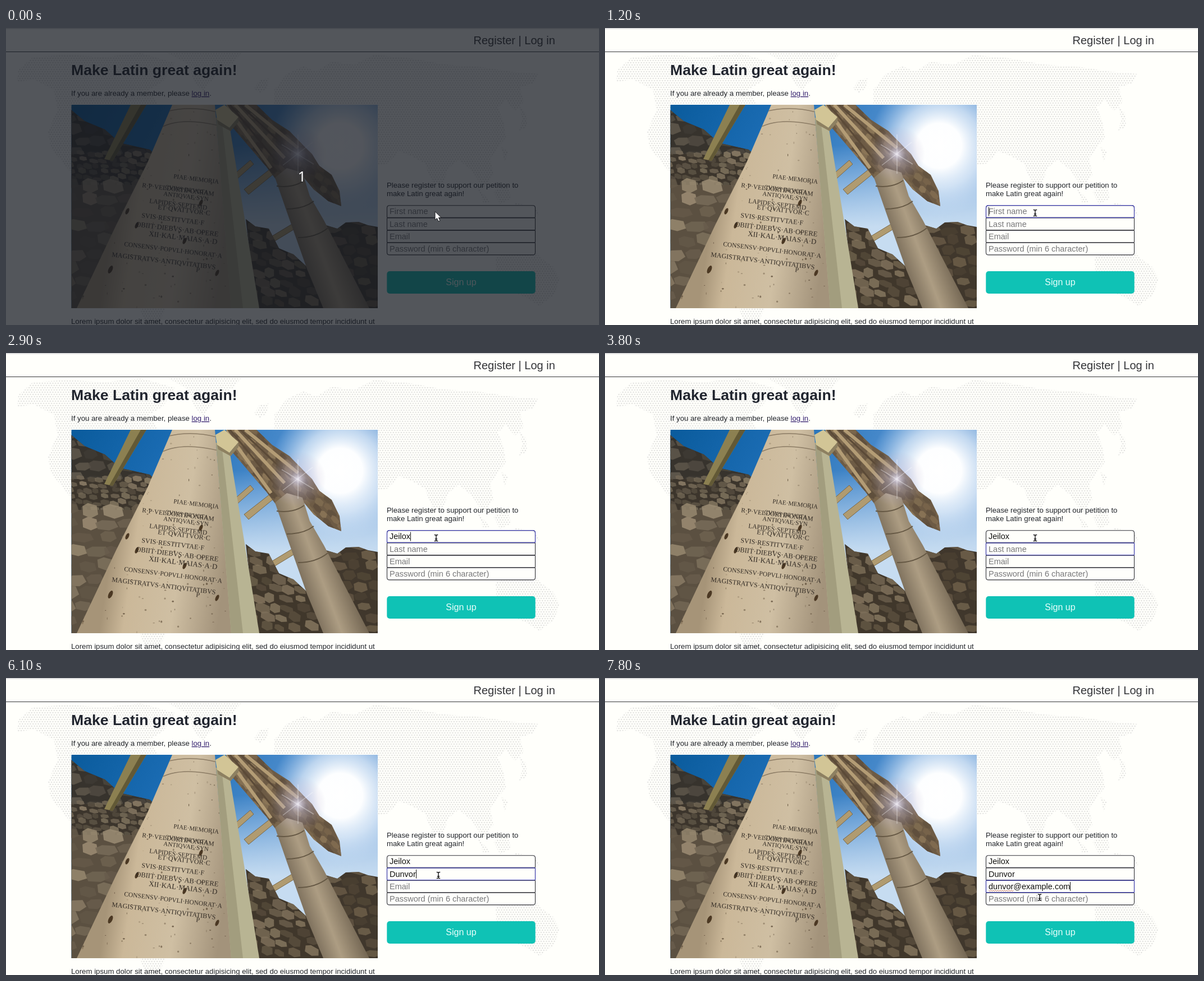
Write an HTML page that moves like this. It is 1056 by 530 pixels and loops after 8 s.

```html
<!DOCTYPE html>
<html lang="en">
<head>
<meta charset="utf-8">
<title>Petition sign-up</title>
<style>
  html, body { margin: 0; width: 100%; height: 100%; overflow: hidden; background: #fffffb; }
  svg { display: block; width: 1056px; height: 530px; font: 13.23px "Liberation Sans", Arial, sans-serif; fill: #22252b; }
  text { white-space: pre; }
  .field { font-size: 14.5px; }
  .carved { font-family: "Liberation Serif", serif; fill: #332c25; }
</style>
</head>
<body>
<svg viewBox="0 0 1056 530">
  <defs>
    <pattern id="dots" width="4.7" height="8" patternUnits="userSpaceOnUse">
      <g fill="#dededc"><circle cx="1.2" cy="2" r="1.15"/><circle cx="3.55" cy="6" r="1.15"/></g>
    </pattern>
    <linearGradient id="sky" x2="1" y2=".35">
      <stop offset="0" stop-color="#0a5b9c"/><stop offset=".3" stop-color="#1a6bb2"/>
      <stop offset=".65" stop-color="#4a8bcc"/><stop offset="1" stop-color="#7fa9d8"/>
    </linearGradient>
    <linearGradient id="haze" x2="0" y2="1">
      <stop offset=".2" stop-color="#cfe3f6" stop-opacity="0"/><stop offset=".6" stop-color="#c6dcf1"/>
    </linearGradient>
    <radialGradient id="sun">
      <stop offset="0" stop-color="#fff"/><stop offset=".32" stop-color="#fdfeff"/>
      <stop offset=".6" stop-color="#e4effb" stop-opacity=".72"/><stop offset="1" stop-color="#c2daf5" stop-opacity="0"/>
    </radialGradient>
    <radialGradient id="flare">
      <stop offset="0" stop-color="#f3efff" stop-opacity=".9"/><stop offset=".3" stop-color="#c7c2e0" stop-opacity=".45"/>
      <stop offset="1" stop-color="#b6a9c5" stop-opacity="0"/>
    </radialGradient>
    <linearGradient id="shaft" gradientUnits="userSpaceOnUse" x1="195" y1="300" x2="400" y2="330">
      <stop offset="0" stop-color="#a69478"/><stop offset=".2" stop-color="#cbb899"/>
      <stop offset=".6" stop-color="#cfbfa3"/><stop offset="1" stop-color="#a3937b"/>
    </linearGradient>
    <linearGradient id="shaft2" gradientUnits="userSpaceOnUse" x1="520" y1="400" x2="600" y2="370">
      <stop offset="0" stop-color="#796c59"/><stop offset=".45" stop-color="#ad9d83"/><stop offset="1" stop-color="#716451"/>
    </linearGradient>
    <clipPath id="photo"><rect x="116.5" y="137" width="545.5" height="363"/></clipPath>
    <clipPath id="wallL"><path d="M116 146L140 166 176 181 203 205 256 217 300 260 240 500H116Z"/></clipPath>
    <clipPath id="wallM"><path d="M427 341L444 354 468 358 486 393 512 404 540 430 575 500H445Z"/></clipPath>
    <clipPath id="wallR"><path d="M570 352L590 358 605 347 628 346 645 352 662 355V500H628Z"/></clipPath>
    <clipPath id="lintel"><path d="M392 137H446L474 164 505 184 528 208 545 225 558 246 580 262 594 291 597 318 574 309 548 288 528 264 482 272 463 247 404 178Z"/></clipPath>
    <clipPath id="column"><path d="M296 137H372L402 500H126L196 352 252 240Z"/></clipPath>
  </defs>

  <rect width="1056" height="530" fill="#fffffb"/>
  <g fill="url(#dots)">
    <path d="M22 75L48 52 110 48 175 52 240 45 300 62 280 95 255 110 270 137H300V260H117L100 238 80 215 75 185 92 145 85 110 50 92 20 96Z"/>
    <path d="M285 43H420L405 62 385 72 368 92 350 112 335 95 325 65Z"/>
    <path d="M442 108L452 92 468 90 464 108 452 116Z"/>
    <path d="M478 110L500 82 530 68 552 78 580 60 620 66 655 48 720 54 780 65 850 70 900 78 948 82 940 98 915 106 922 132 906 148 890 128 876 142 886 168 890 195 876 214 862 232 868 262 850 285 830 255 806 235 788 250 775 285 760 278 746 242 722 228 700 220 680 242 662 244V137H478Z"/>
    <path d="M914 140L926 152 928 176 912 184 920 164ZM882 210L894 222 888 238ZM840 285L862 310 850 312ZM868 292L892 280 900 304 880 314ZM905 312L940 318 952 334 918 330Z"/>
    <path d="M872 410L905 392 920 400 936 388 950 408 974 426 986 448 976 476 950 496 925 480 898 470 875 474Z"/>
    <path d="M238 498H286L276 518 264 530H249Z"/>
  </g>
  <path d="M0 1H1056" stroke="#b9b9bd"/>
  <path d="M0 42.5H1056" stroke="#35363a"/>
  <text x="832.5" y="28.5" font-size="20" fill="#333438">Register | Log in</text>
  <text x="116" y="84" font-size="26.6" font-weight="bold" fill="#20242e">Make Latin great again!</text>
  <text x="116" y="121">If you are already a member, please <tspan fill="#34206f" text-decoration="underline">log in</tspan>.</text>
  <text x="116" y="528">Lorem ipsum dolor sit amet, consectetur adipisicing elit, sed do eiusmod tempor incididunt ut</text>

  <g clip-path="url(#photo)">
    <rect x="116" y="137" width="546" height="363" fill="url(#sky)"/>
    <rect x="380" y="137" width="282" height="363" fill="url(#haze)"/>
    <circle cx="595" cy="210" r="125" fill="url(#sun)"/>
    <g fill="#b09b70" stroke="#786646">
      <path d="M405 262L435 236 441 243 411 270ZM424 288L470 252 477 260 432 297ZM453 384L514 347 520 355 456 394Z"/>
    </g>
    <g id="masonry"></g>
    <path d="M222 137H250L190 237 175 234Z" fill="#8c8051"/>
    <path d="M240 137H250L190 237 184 236Z" fill="#625936"/>
    <path d="M479 267L500 250 528 258 541 300 566 343 647 500H565L536 430 499 325Z" fill="url(#shaft2)"/>
    <path d="M482 282Q512 286 531 272M500 323Q530 323 548 309M520 374Q552 374 573 357" fill="none" stroke="#655844" stroke-width="2"/>
    <g clip-path="url(#column)">
      <rect x="116" y="137" width="300" height="363" fill="url(#shaft)"/>
      <g id="pits"></g>
      <path d="M270 181Q306 157 378 174M286 149Q330 138 375 150" fill="none" stroke="#8b7b64" stroke-width="1.5"/>
    </g>
    <path d="M374 160L397 168 451 500H401Z" fill="#b8b493"/>
    <path d="M374 160L384 163 422 500H401Z" fill="#a29d7e"/>
    <path d="M373 146L389 137 414 159 398 178 376 164Z" fill="#d2c596"/>
    <path d="M376 164L398 178 414 159V168L400 184 378 172Z" fill="#8d8061"/>
    <g id="inscription" class="carved"></g>
    <circle cx="520" cy="225" r="50" fill="url(#flare)"/>
    <path d="M520 190V260M491 208L548 243M493 245L546 204" stroke="#fff" stroke-opacity=".35" stroke-width="1.5"/>
  </g>

  <text x="678" y="285">Please register to support our petition to</text>
  <text x="678" y="299.5">make Latin great again!</text>
  <g id="form"></g>
  <path id="squiggle" fill="none" stroke="#b9654c" stroke-width="1"/>
  <path id="caret" stroke="#111"/>
  <rect x="678.3" y="434" width="264.4" height="40" rx="5" fill="#0fc2b5"/>
  <text x="810.5" y="459" font-size="16" text-anchor="middle" fill="#eafffb">Sign up</text>

  <g id="ibeam" fill="none" stroke-linecap="round">
    <path id="beamShape" d="M-2.7 -5.5Q0 -5.5 0 -4 0 -5.5 2.7 -5.5M0 -4.5V4.5M-2.7 5.5Q0 5.5 0 4 0 5.5 2.7 5.5M-1.6 2H1.6" stroke="#fff" stroke-width="3"/>
    <use href="#beamShape"/>
    <path d="M-2.7 -5.5Q0 -5.5 0 -4 0 -5.5 2.7 -5.5M0 -4.5V4.5M-2.7 5.5Q0 5.5 0 4 0 5.5 2.7 5.5M-1.6 2H1.6" stroke="#111" stroke-width="1.4"/>
  </g>
  <g id="countdown">
    <rect width="1056" height="530" fill="#141820" fill-opacity=".73"/>
    <text x="527" y="274" text-anchor="middle" style="font: 25px 'Noto Sans', sans-serif" fill="#fff">1</text>
    <path d="M764 327.5V342.5L767.5 339.5 770 345 772.8 343.8 770.4 338.4H775Z" fill="#fff" stroke="#15171b"/>
  </g>
</svg>
<script>
const LOOP = 8000;
const TEXT_X = 683;
const $ = id => document.getElementById(id);

function add(parent, tag, attrs, text = '') {
  const node = document.createElementNS('http://www.w3.org/2000/svg', tag);
  for (const key in attrs) node.setAttribute(key, attrs[key]);
  node.textContent = text;
  return parent.appendChild(node);
}

let seed = 17;
const random = () => (seed = seed * 16807 % 2147483647) / 2147483647;
const between = (a, b) => a + (b - a) * random();

// Irregular courses of stone inside a clipped area.
function stones(clip, [x, y, w, h], size, base, tones, tilt = 0) {
  const group = add($('masonry'), 'g', { 'clip-path': `url(#${clip})` });
  add(group, 'rect', { x, y, width: w, height: h, fill: base });
  for (let row = y; row < y + h; row += size * .62) {
    for (let col = x - random() * size; col < x + w; col += size * between(.7, 1.2)) {
      const sw = size * between(.35, .55), sh = size * between(.2, .34);
      const cy = row + between(-3, 3);
      const d = `M${col - sw} ${cy - sh * .5}L${col - sw * .4} ${cy - sh} ${col + sw * .7} ${cy - sh * .8} ` +
        `${col + sw} ${cy + sh * .4} ${col + sw * .2} ${cy + sh} ${col - sw * .8} ${cy + sh * .7}Z`;
      add(group, 'path', {
        d, fill: tones[Math.floor(random() * tones.length)], opacity: between(.5, .95),
        transform: `rotate(${tilt + between(-9, 9)} ${col} ${cy})`
      });
    }
  }
}

stones('wallL', [116, 140, 190, 90], 34, '#37332d', ['#534d43', '#60594d', '#403c36']);
stones('wallL', [116, 225, 190, 60], 17, '#3c352c', ['#756a57', '#5b5244', '#867963'], 10);
stones('wallL', [116, 280, 150, 220], 40, '#5b5041', ['#8b7d67', '#766a57', '#9b8c73', '#675b4b']);
stones('wallM', [425, 338, 155, 165], 27, '#40372b', ['#6d604b', '#7e705a', '#574c3c', '#8b7c63'], 18);
stones('wallR', [568, 342, 96, 160], 30, '#40372c', ['#655843', '#75664f', '#514636']);
stones('lintel', [390, 136, 210, 185], 19, '#6d5b45', ['#8c7758', '#5e4e3c', '#806b50'], 40);
const lintel = add($('masonry'), 'g', { 'clip-path': 'url(#lintel)', fill: 'none' });
for (let i = 0; i < 5; i++) {
  add(lintel, 'path', {
    d: `M${390 + i * 9} 137L${472 + i * 12} ${250 - i * 9}`,
    stroke: i % 2 ? '#5b4a37' : '#b39c75', 'stroke-width': i % 2 ? 3 : 6
  });
}

for (let i = 0; i < 150; i++) {
  add($('pits'), 'ellipse', {
    cx: between(130, 400), cy: between(140, 500), rx: between(.5, 1.9), ry: between(.5, 2.3),
    fill: '#5d4c38', opacity: between(.15, .8)
  });
}
for (const [cx, cy, r] of [[216, 327, 4], [233, 352, 4], [186, 431, 5], [347, 312, 4], [376, 437, 4], [318, 380, 4]])
  add($('pits'), 'ellipse', { cx, cy, rx: r * .7, ry: r * 1.5, fill: '#4b3823', transform: `rotate(25 ${cx} ${cy})` });

const carving = [
  [298, 268, 11, 'PIAE·MEMORIA'], [242, 284, 11.5, 'R·P·VELDORTII·ONRAM'],
  [283, 287, 10.5, 'CVIVS·DEVOTA'], [280, 299, 11, 'ANTIQVAE·SYN'],
  [255, 312, 11.5, 'LAPIDES·SEPTEMD'], [270, 323, 12, 'ET·QVATTVOR·C'],
  [241, 338, 12, 'SVIS·RESTITVTAE·F'], [231, 354, 12.5, 'OBIIT·DIEBVS·AB·OPERE'],
  [254, 371, 13, 'XII·KAL·MAIAS·A·D'], [210, 389, 11.5, 'CONSENSV·POPVLI·HONORAT·A'],
  [188, 408, 12, 'MAGISTRATVS·ANTIQVITATIBVS'], [338, 435, 12, 'P']
];
for (const [x, y, size, line] of carving)
  add($('inscription'), 'text', { x, y, 'font-size': size, transform: `rotate(7 ${x} ${y})` }, line);

// Each key time reveals one more character; a pasted value has a single key.
const fields = [
  { hint: 'First name', focus: 1200, blur: 3200, value: 'Jeilox', keys: [1800, 2100, 2300, 2500, 2600, 2900] },
  { hint: 'Last name', focus: 3200, blur: 7000, value: 'Dunvor', keys: [4000, 4200, 4600, 4800, 5000, 5600] },
  { hint: 'Email', focus: 7000, blur: LOOP, value: 'dunvor@example.com', keys: [7300], pasted: true },
  { hint: 'Password (min 6 character)', focus: LOOP, blur: LOOP, value: '', keys: [] }
];
const caretOff = [[1700, 1800], [3800, 4000], [6200, 7000]];
const pointer = [
  [0, 766, 330], [6100, 770, 352], [6200, 772, 357], [6300, 773, 361],
  [6400, 774, 365], [6600, 774, 368.5], [7800, 774, 391.5]
];

function outline(i) {
  const top = 316.7 + i * 22.2, bottom = top + 21.6, left = 678.5, right = 942.5;
  const a = i === 0 ? 4.5 : 1, b = i === 3 ? 4.5 : 1;
  return `M${left + a} ${top}H${right - a}Q${right} ${top} ${right} ${top + a}V${bottom - b}` +
    `Q${right} ${bottom} ${right - b} ${bottom}H${left + b}Q${left} ${bottom} ${left} ${bottom - b}` +
    `V${top + a}Q${left} ${top} ${left + a} ${top}Z`;
}

fields.forEach((field, i) => {
  field.box = add($('form'), 'path', { d: outline(i), fill: '#fffffb', stroke: '#303138', 'stroke-width': 1.1 });
});
fields.forEach((field, i) => {
  field.ring = add($('form'), 'path', { d: outline(i), fill: 'none', stroke: '#4444b4', 'stroke-width': 1.2 });
  field.label = add($('form'), 'text', { x: TEXT_X, y: 332.3 + i * 22.2, class: 'field' });
});

let wave = `M${TEXT_X + .5} 379`;
for (let i = 0; i < 22; i++) wave += `l2 ${i % 2 ? -1.5 : 1.5}`;
$('squiggle').setAttribute('d', wave);

const show = (node, visible) => node.setAttribute('visibility', visible ? 'visible' : 'hidden');

function render(t) {
  const started = t >= 500;
  show($('countdown'), !started);
  show($('ibeam'), started);
  const [, px, py] = pointer.filter(step => step[0] <= t).pop();
  $('ibeam').setAttribute('transform', `translate(${px} ${py})`);

  let active = -1;
  fields.forEach((field, i) => {
    const focused = t >= field.focus && t < field.blur;
    if (focused) active = i;
    show(field.ring, focused);
    const typed = field.keys.filter(key => key <= t).length;
    const count = field.pasted && typed ? field.value.length : typed;
    field.typed = count;
    const content = count ? field.value.slice(0, count) : field.hint;
    if (field.label.textContent !== content) field.label.textContent = content;
    field.label.setAttribute('fill', count ? '#111' : '#77777a');
  });

  const blinking = caretOff.some(([from, to]) => t >= from && t < to);
  show($('caret'), active >= 0 && !blinking);
  if (active >= 0) {
    const { label, typed } = fields[active];
    const x = TEXT_X + .5 + (typed ? Math.round(label.getComputedTextLength()) : 0);
    const y = 319.5 + active * 22.2;
    $('caret').setAttribute('d', `M${x} ${y}v16`);
  }
  show($('squiggle'), t >= 7400);
}

const start = performance.now();
function tick() {
  render((performance.now() - start) % LOOP);
  requestAnimationFrame(tick);
}
tick();
</script>
</body>
</html>
```
